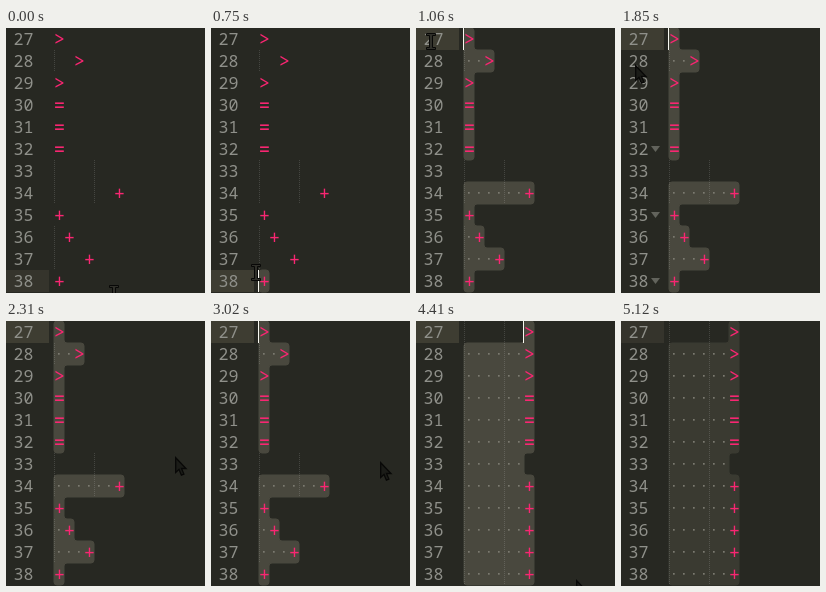
An HTML page that plays this animation: 199x265 px, repeating every 5.35 s.

```html
<!DOCTYPE html>
<html lang="en">
<head>
<meta charset="utf-8">
<title>Aligning selected lines</title>
<style>
html, body { margin: 0; width: 100%; height: 100%; overflow: hidden; background: #272822; }
svg { display: block; width: 199px; height: 265px; }
text { font: 16.67px "Noto Sans Mono", "DejaVu Sans Mono", monospace; white-space: pre; }
.number { fill: #8f908a; }
.operator { fill: #f92672; font-size: 19px; text-anchor: middle; }
.guide { stroke: #fff; stroke-opacity: .14; stroke-dasharray: 1 1; }
.dot { fill: #7b7a70; }
.fold { fill: #62635c; }
.gutter { fill: #3e3d32; }
.selection { fill: #49483e; stroke: #49483e; }
.caret { fill: #f8f8f0; }
.arrow { fill: #1b1c18; stroke: #080807; stroke-width: 1.3; }
.beam { fill: #30302a; stroke: #080807; }
</style>
</head>
<body>
<svg id="stage" viewBox="0 0 199 265"></svg>
<script>
const LOOP = 5350, ROW = 22, COL = 10, LEFT = 48, MARGIN = 6;
const CLICK_AT = 530, DRAG_END = 1060, LEAVE_TEXT = 1530, ALIGN_AT = 3560, BLUR_AT = 5120;
const ragged = ['>', '  >', '>', '=', '=', '=', '', '      +', '+', ' +', '   +', '+'];
const aligned = ragged.map(line => ' '.repeat(MARGIN) + line.trim());
const LAST = ragged.length - 1;
const stage = document.getElementById('stage');

// Pointer stops as time, x, y.
const stops = [
  [0, 108, 257], [750, 45, 236], [DRAG_END, 15, 5], [1500, 15, 7], [1600, 14, 34], [1850, 14, 37],
  [2310, 169, 136], [3020, 169, 141], [ALIGN_AT, 166, 143], [3950, 165, 146], [4490, 160, 266]
];
const caretShown = [[CLICK_AT, 1600], [1720, 2310], [2870, 3950], [4080, 4800]];

const clamp = (v, low, high) => Math.min(high, Math.max(low, v));
const pulse = (t, on, off) => clamp(Math.min(t - on, off - t) / 120, 0, 1);

function pointerAt(t) {
  const next = stops.findIndex(stop => stop[0] > t);
  if (next < 0) return stops.at(-1).slice(1);
  const [t0, x0, y0] = stops[next - 1], [t1, x1, y1] = stops[next];
  const k = (t - t0) / (t1 - t0), eased = k * k * (3 - 2 * k);
  return [x0 + (x1 - x0) * eased, y0 + (y1 - y0) * eased];
}

// The caret follows the pointer until the drag ends.
function caretAt(t) {
  if (t >= ALIGN_AT) return [0, MARGIN];
  const [x, y] = pointerAt(Math.min(t, DRAG_END));
  return [clamp(Math.floor((y + 8) / ROW), 0, LAST), clamp(Math.round((x - LEFT) / COL), 0, 1)];
}

function add(parent, tag, attrs, content) {
  const node = document.createElementNS('http://www.w3.org/2000/svg', tag);
  set(node, attrs);
  if (content) node.textContent = content;
  parent.append(node);
  return node;
}

function set(node, attrs) {
  for (const name in attrs) node.setAttribute(name, attrs[name]);
}

// Corner points down one side of a run of rows.
function sidePoints(edges, first) {
  const points = [];
  edges.forEach((x, i) => {
    if (x === edges[i - 1]) return;
    const y = (first + i) * ROW;
    if (i) points.push([edges[i - 1], y]);
    points.push([x, y]);
  });
  points.push([edges.at(-1), (first + edges.length) * ROW]);
  return points;
}

function roundedPath(points, radius = 3) {
  const toward = (p, q) => {
    const k = radius / Math.hypot(q[0] - p[0], q[1] - p[1]);
    return [p[0] + (q[0] - p[0]) * k, p[1] + (q[1] - p[1]) * k];
  };
  return points.map((p, i) => {
    const before = points.at(i - 1), after = points[(i + 1) % points.length];
    return `${i ? 'L' : 'M'}${toward(p, before)}Q${p} ${toward(p, after)}`;
  }).join('') + 'Z';
}

function selectionPath(lines, from) {
  let path = '', lefts = [], rights = [];
  for (let row = from; row <= LAST + 1; row++) {
    const length = lines[row]?.length;
    if (length) {
      lefts.push(LEFT + (lines === aligned && row === 0 ? MARGIN * COL : 0));
      rights.push(LEFT + length * COL);
    } else if (rights.length) {
      const first = row - rights.length;
      path += roundedPath([...sidePoints(rights, first), ...sidePoints(lefts, first).reverse()]);
      lefts = [];
      rights = [];
    }
  }
  return path;
}

const gutter = add(stage, 'rect', { class: 'gutter', width: 43, height: ROW });
const selection = add(stage, 'path', { class: 'selection' });

function makeLayout(lines) {
  const group = add(stage, 'g', {});
  const dots = lines.map((line, row) => {
    const top = row * ROW, operator = line.trim();
    const indent = line.length - operator.length;
    const depth = operator ? indent : MARGIN;
    for (let col = 0; col < depth; col += 4) {
      const x = LEFT + col * COL + .5;
      add(group, 'line', { class: 'guide', x1: x, x2: x, y1: top, y2: top + ROW });
    }
    const rowDots = add(group, 'g', { class: 'dot' });
    for (let col = 0; col < indent && !(lines === aligned && row === 0); col++) {
      add(rowDots, 'rect', { x: LEFT + col * COL + 4, y: top + 10, width: 1.7, height: 1.7 });
    }
    add(group, 'text', { class: 'operator', x: LEFT + indent * COL + 5.5, y: top + 18.4 }, operator);
    return rowDots;
  });
  return { group, dots, lines };
}

const layouts = [makeLayout(ragged), makeLayout(aligned)];
const folds = add(stage, 'g', { class: 'fold' });

for (let row = 0; row <= LAST; row++) {
  add(stage, 'text', { class: 'number', x: 7.6, y: row * ROW + 17 }, String(27 + row));
  if (row % 3 === 2 && row > 2) add(folds, 'path', { d: `M30 ${row * ROW + 8}h9l-4.5 6z` });
}

const caret = add(stage, 'rect', { class: 'caret', width: 1, height: ROW });
const beam = add(stage, 'path', { class: 'beam', d: 'M-4.5 .5H4.5V2.5H1.5V14.5H4.5V16.5H-4.5V14.5H-1.5V2.5H-4.5Z' });
const arrow = add(stage, 'path', { class: 'arrow', d: 'M.7 .7V15.5L4 12.4L6.4 18.2L8.9 17.1L6.5 11.5H11Z' });

const show = (node, visible) => set(node, { display: visible ? 'inline' : 'none' });

function draw(t) {
  const [row, col] = caretAt(t);
  const current = layouts[t < ALIGN_AT ? 0 : 1];
  const from = col === 1 ? LAST + 1 : row;
  const blurred = t >= BLUR_AT;

  for (const layout of layouts) show(layout.group, layout === current);
  current.dots.forEach((node, i) => show(node, i >= from));
  set(selection, { d: selectionPath(current.lines, from), opacity: blurred ? .56 : 1 });
  set(gutter, { y: row * ROW, opacity: blurred || t < CLICK_AT ? .6 : 1 });
  set(caret, {
    x: LEFT - 1 + col * COL,
    y: row * ROW,
    opacity: Math.max(...caretShown.map(span => pulse(t, ...span)))
  });
  set(folds, { opacity: pulse(t, LEAVE_TEXT, 2080) });

  const pointer = { transform: `translate(${pointerAt(t).map(Math.round)})` };
  set(beam, pointer);
  set(arrow, pointer);
  show(beam, t < LEAVE_TEXT);
  show(arrow, t >= LEAVE_TEXT);
}

const start = performance.now();
function tick() {
  draw((performance.now() - start) % LOOP);
  requestAnimationFrame(tick);
}
tick();
</script>
</body>
</html>
```
